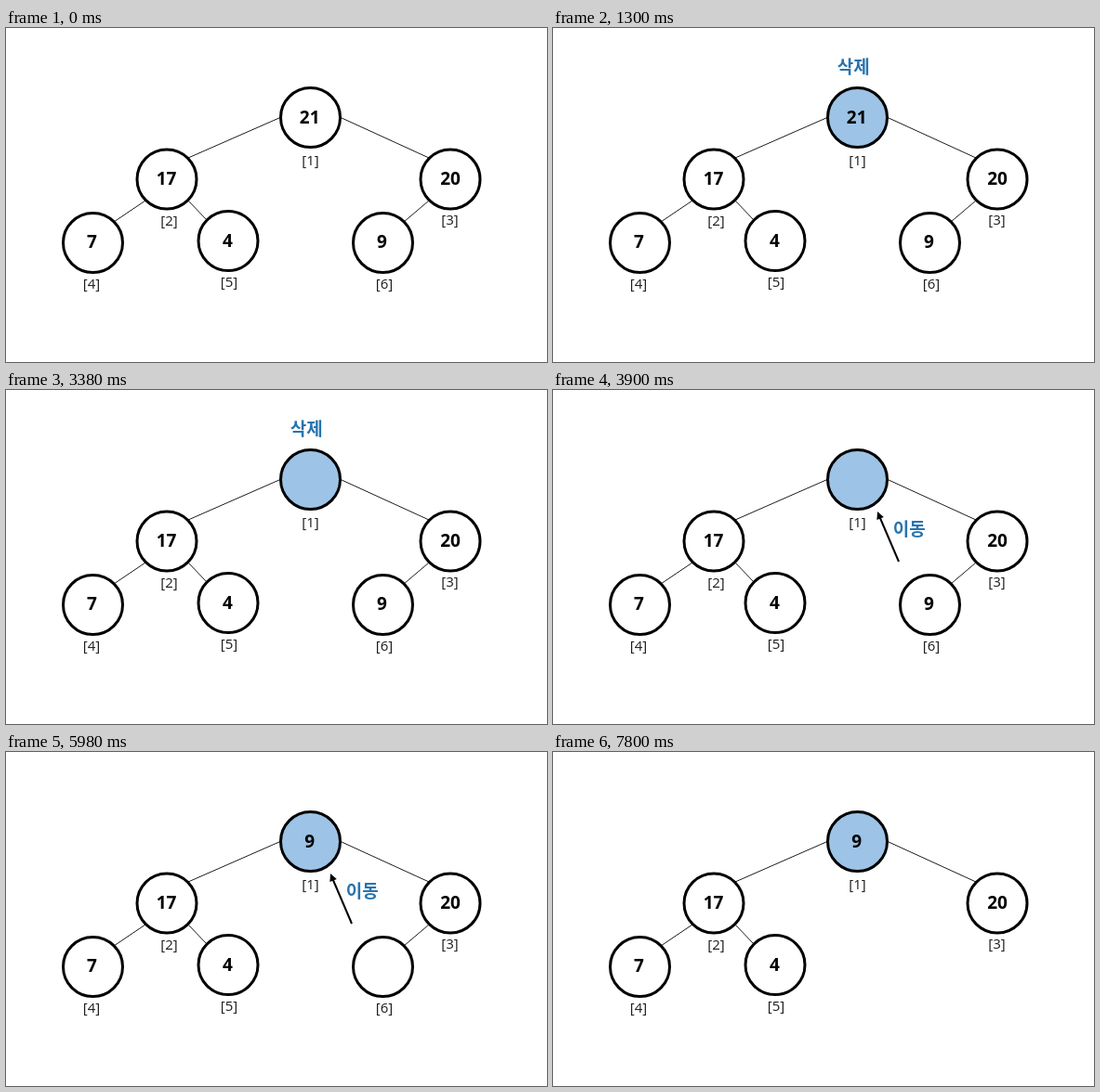
Recreate the animation shown at these times as an HTML page. Size 582 by 360 pixels, loop 8000 ms.

```html
<!DOCTYPE html>
<html lang="ko">
<head>
<meta charset="utf-8">
<title>Heap deletion</title>
<style>
  html, body { margin: 0; width: 100%; height: 100%; overflow: hidden; background: #fff; }
  svg { display: block; width: 582px; height: 360px; }
  text { text-anchor: middle; }
  .edge { stroke: #1c1c1c; stroke-width: 1; }
  .node { fill: #fff; stroke: #000; stroke-width: 3; }
  .value { font: bold 19px "Open Sans", "Noto Sans", sans-serif; }
  .index { font: 15px "Open Sans", "Noto Sans", sans-serif; fill: #1c1c1c; }
  .note { font: bold 19px "Noto Sans CJK KR", "Noto Sans CJK", sans-serif; fill: #2774ae; }
  .arrow { stroke: #000; stroke-width: 2; }

  /* Each step lasts 1300 ms = 16.25% of the loop */
  .root, .old, .delete, .move, .new, .last, .remove, .leaf { animation: 8s step-end infinite; }
  .root { animation-name: root; }
  .old { animation-name: old; }
  .delete { animation-name: delete; }
  .move { animation-name: move; }
  .new { animation-name: new; }
  .last { animation-name: last; }
  .remove { animation-name: remove; }
  .leaf { animation-name: leaf; }
  @keyframes root { 0% { fill: #fff; } 16.25%, 100% { fill: #9dc3e6; } }
  @keyframes old { 0% { opacity: 1; } 32.5%, 100% { opacity: 0; } }
  @keyframes delete { 0% { opacity: 0; } 16.25% { opacity: 1; } 48.75%, 100% { opacity: 0; } }
  @keyframes move { 0% { opacity: 0; } 48.75% { opacity: 1; } 81.25%, 100% { opacity: 0; } }
  @keyframes new { 0% { opacity: 0; } 65%, 100% { opacity: 1; } }
  @keyframes last { 0% { opacity: 1; } 65%, 100% { opacity: 0; } }
  @keyframes remove { 0% { opacity: 0; } 81.25% { opacity: 1; } 97.5%, 100% { opacity: 0; } }
  @keyframes leaf { 0% { opacity: 1; } 97.5%, 100% { opacity: 0; } }
</style>
</head>
<body>
<svg viewBox="0 0 582 360">
  <g class="edge">
    <path d="M295 96.5L196 140M360 96.5L455 140M150 186L116 209M196 186L216 207"/>
  </g>

  <circle class="node root" cx="327.5" cy="96.5" r="32"/>
  <text class="value old" x="326.7" y="102.5">21</text>
  <text class="value new" x="326.7" y="102.5">9</text>
  <text class="index" x="327.5" y="148">[1]</text>

  <circle class="node" cx="173" cy="163" r="32"/>
  <text class="value" x="172.5" y="169">17</text>
  <text class="index" x="175.5" y="213">[2]</text>

  <circle class="node" cx="478" cy="163" r="32"/>
  <text class="value" x="478" y="169">20</text>
  <text class="index" x="477.5" y="212">[3]</text>

  <circle class="node" cx="93.5" cy="231.5" r="32"/>
  <text class="value" x="92.5" y="237">7</text>
  <text class="index" x="92" y="281">[4]</text>

  <circle class="node" cx="239" cy="229.5" r="32"/>
  <text class="value" x="238.5" y="235.5">4</text>
  <text class="index" x="240" y="279">[5]</text>

  <g class="leaf">
    <path class="edge" d="M455 186L428 209"/>
    <circle class="node" cx="405.5" cy="231.5" r="32"/>
    <text class="value last" x="404.5" y="237">9</text>
    <text class="index" x="407" y="281">[6]</text>
  </g>

  <text class="note delete" x="323.2" y="48.5">삭제</text>
  <g class="move">
    <path class="arrow" d="M372 185L351.5 137"/>
    <path d="M349 131L348.4 140L355.8 136.9Z"/>
    <text class="note" x="383.2" y="157">이동</text>
  </g>
  <text class="note remove" x="362.5" y="200">제거</text>
</svg>
</body>
</html>
```
